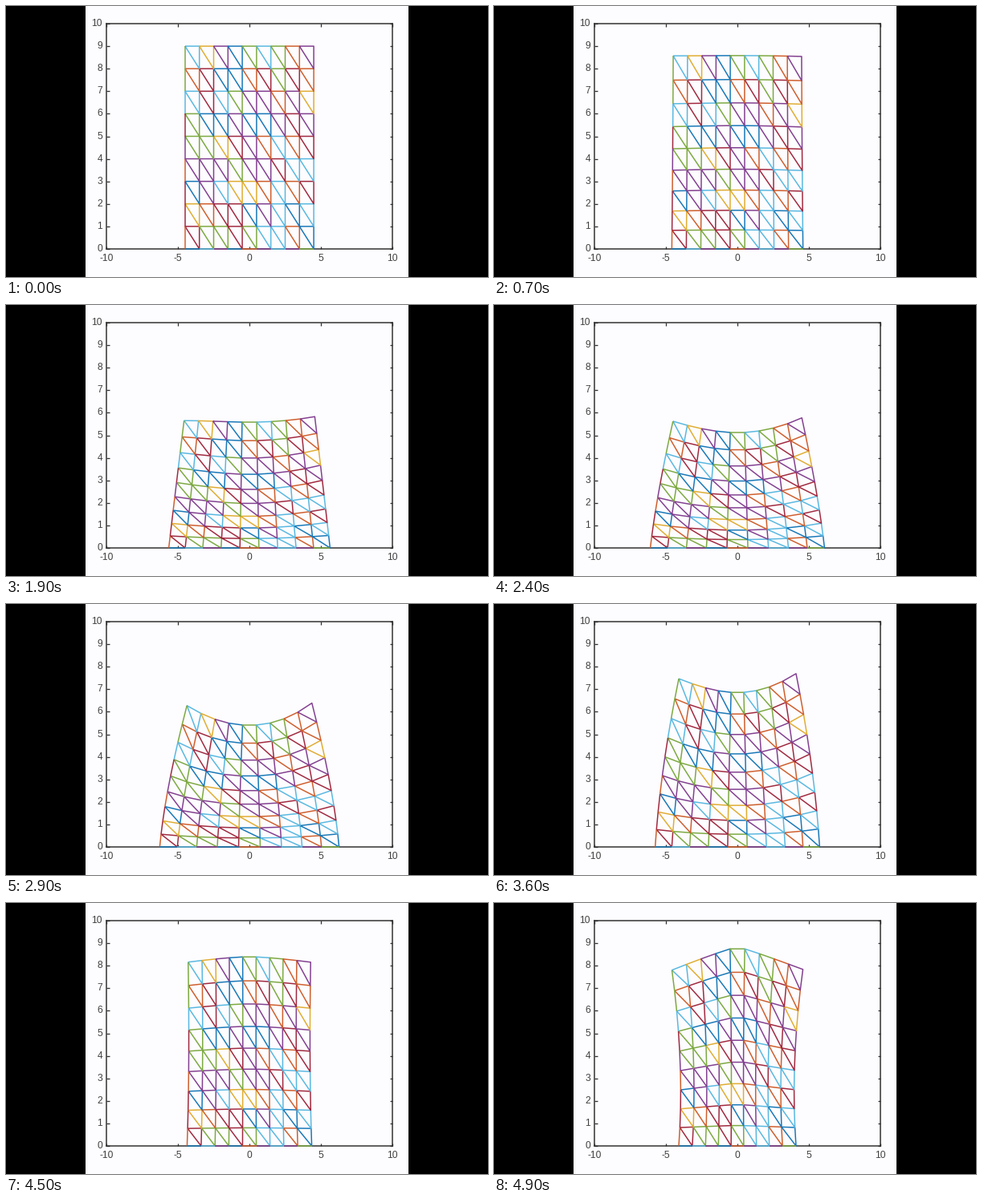
Recreate the animation shown at these times as a matplotlib script. Size 600 px wide and 338 px high, loop 5 s.

```python
import numpy as np
import matplotlib.pyplot as plt
from matplotlib.animation import FuncAnimation
from matplotlib.collections import LineCollection
from matplotlib.colors import to_rgb
from matplotlib.patches import Rectangle

W, H, DPI = 600, 338, 100
FRAMES, INTERVAL = 50, 100
N = 10  # nodes per side
PT = 72 / DPI
INK = "#303030"
PALETTE = ["#0072bd", "#d95319", "#edb120", "#7e2f8e",
           "#77ac30", "#4dbeee", "#a2142f"]

# Key moments of the bounce: release, impact wave, squash, rebound, stretch.
TIMES = np.array([0, 12, 19, 29, 36, 41, 49], float)
FOOT = [4.5, 4.86, 5.64, 6.27, 5.75, 4.76, 4.1]      # half-width at the floor
CROWN = [4.5, 4.5, 4.57, 4.37, 4.1, 4.07, 4.58]      # half-width at the top
EDGE = [9, 7.7, 5.74, 6.33, 7.58, 8.26, 7.82]        # height of the corners
MIDDLE = [9, 7.7, 5.58, 5.4, 6.85, 7.86, 8.84]       # height of the centre
ARCH = [0, 0, 1.1, 0.7, 1.4, 0.1, 0.2]               # lift of the side rows

u = np.linspace(-1, 1, N)[None, :]
s = np.linspace(0, 1, N)[:, None]


def ease(values, t):
    """Smooth curve through the key values, starting at rest."""
    values = np.array(values, float)
    slope = np.gradient(values, TIMES)
    slope[0] = 0
    k = min(np.searchsorted(TIMES, t, side="right") - 1, len(TIMES) - 2)
    span = TIMES[k + 1] - TIMES[k]
    q = (t - TIMES[k]) / span
    blend = q * q * (3 - 2 * q)
    return (values[k] * (1 - blend) + values[k + 1] * blend
            + span * q * (1 - q) * ((1 - q) * slope[k] - q * slope[k + 1]))


def nodes_at(t):
    foot, crown, edge, middle, arch = (
        ease(track, t) for track in (FOOT, CROWN, EDGE, MIDDLE, ARCH))
    lift = edge - middle
    bow = s * (1 - s)

    half = foot + (crown - foot) * s + 1.3 * lift * bow
    x = half * u + 0.3 * (half - 4.5) * u * (1 - u**2)

    squash = 0.2 * np.sqrt(max(9 - middle, 0))
    y = middle * (s - squash * bow)
    y = y + (lift * s + arch * bow) * np.abs(u) ** (1.6 + 0.5 * lift)
    y = y + 0.08 * arch * s * u**3
    return np.stack([x, y], axis=-1)


def mesh_lines(p):
    cells = range(N - 1)
    lines = [[p[r + 1, c], p[r, c + 1], p[r + 1, c + 1], p[r + 1, c]]
             for r in cells for c in cells]
    lines += [[p[r, 0], p[r + 1, 0]] for r in cells]
    lines += [[p[0, c], p[0, c + 1]] for c in cells]
    return lines


def muted(color):
    return 0.85 * np.array(to_rgb(color)) + 0.15 * 0.6


plt.rcParams["font.family"] = "Liberation Sans"
fig = plt.figure(figsize=(W / DPI, H / DPI), dpi=DPI, facecolor="black")
fig.add_artist(Rectangle((99 / W, 0), 402 / W, 1, color="#fdfcfe", lw=0,
                         transform=fig.transFigure, zorder=-1))

ax = fig.add_axes([125 / W, (H - 303) / H, 356 / W, 281 / H])
ax.set_facecolor("none")
ax.set(xlim=(-10, 10), ylim=(0, 10))
ax.set_xticks(range(-10, 11, 5), ["-10", "-5", "0", "5", "10"])
ax.set_yticks(range(11), [str(v) for v in range(11)])
ax.tick_params(direction="in", top=True, right=True, length=3.5 * PT,
               width=1.3 * PT, color=INK, labelcolor="#404040",
               labelsize=12 * PT)
ax.tick_params(axis="x", pad=6 * PT)
ax.tick_params(axis="y", pad=5 * PT)
for label in ax.get_yticklabels():
    label.set_va("center")
for spine in ax.spines.values():
    spine.set(linewidth=1.5 * PT, color=INK)

segments = mesh_lines(nodes_at(0))
picks = np.random.default_rng(7).integers(len(PALETTE), size=len(segments))
mesh = LineCollection(segments, linewidths=1.5 * PT, zorder=3, clip_on=False,
                      colors=[muted(PALETTE[i]) for i in picks])
ax.add_collection(mesh, autolim=False)


def update(frame):
    mesh.set_segments(mesh_lines(nodes_at(frame)))
    return [mesh]


anim = FuncAnimation(fig, update, frames=FRAMES, interval=INTERVAL,
                     repeat=True, repeat_delay=0)
plt.show()
```
